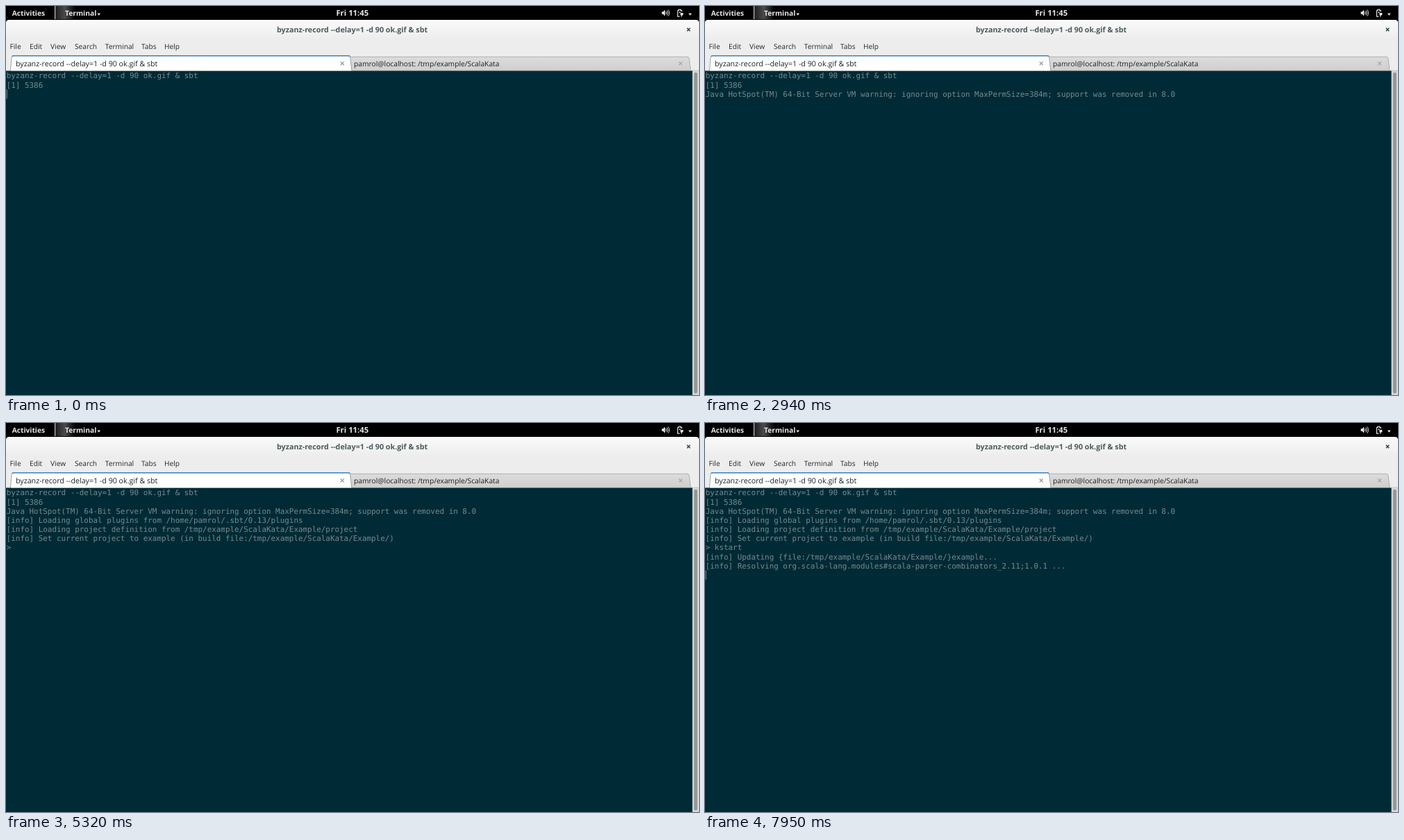
An HTML page for the animation above (8 s loop, 998 by 561 pixels).

```html
<!DOCTYPE html>
<html lang="en">
<head>
<meta charset="utf-8">
<title>Terminal session</title>
<style>
  html, body { margin: 0; width: 100%; height: 100%; overflow: hidden; background: #000; }
  svg { display: block; width: 100vw; height: 100vh; }
  text { font-family: "Open Sans", "Noto Sans", sans-serif; text-rendering: geometricPrecision; white-space: pre; }
  .panel { font-weight: 700; fill: #e6e6e6; }
  .title { font-weight: 700; font-size: 10.75px; fill: #4c5b5e; }
  .menu { font-size: 10.2px; fill: #22282a; }
  .tab { font-size: 10.66px; fill: #1c2123; }
  #screen text { font: 10.92px "DejaVu Sans Mono", monospace; fill: #839496; fill-opacity: .9; }
</style>
</head>
<body>
<svg viewBox="0 0 998 561" preserveAspectRatio="none">
  <defs>
    <linearGradient id="bar" x2="0" y2="1">
      <stop stop-color="#fafafa"/><stop offset="1" stop-color="#ededed"/>
    </linearGradient>
    <linearGradient id="idleTab" x2="0" y2="1">
      <stop stop-color="#dcdcdc"/><stop offset="1" stop-color="#cecece"/>
    </linearGradient>
    <linearGradient id="icon">
      <stop stop-color="#222"/><stop offset=".45" stop-color="#4a4c4a"/><stop offset="1" stop-color="#000"/>
    </linearGradient>
  </defs>

  <!-- Top panel -->
  <rect width="998" height="21"/>
  <rect x="72" width="28" height="19" fill="url(#icon)"/>
  <rect x="70" width="1.3" height="19" fill="#c8c8c8"/>
  <g class="panel">
    <text x="8.7" y="14" font-size="10.2">Activities</text>
    <text x="85" y="14" font-size="10.3">Terminal</text>
    <text x="498.8" y="14" font-size="11.3" text-anchor="middle">Fri 11:45</text>
    <path d="M131.3 10.5h4.8l-2.4 3.2zM982.8 10.5h4.8l-2.4 3.2z"/>
    <path d="M944.5 8.2h2l2.6-2.6v8.8l-2.6-2.6h-2z"/>
    <path d="M950.4 8q1.5 2 0 4M952 6.6q2.6 3.4 0 6.8M953.6 5.4q3.6 4.6 0 9.2" fill="none" stroke="#e6e6e6"/>
    <path d="M967.3 6.3h1.6v-1.3h2.6v1.3h1.6v2M967.3 6.3v8.8h3" fill="none" stroke="#e6e6e6" stroke-width="1.2"/>
    <path d="M969 8.5h2.6v1.2h-2.6zM971.3 10h4v2.2q-.4 1.4-2 1.6v1.9h-1v-1.9q-1-.4-1-1.6z"/>
  </g>

  <!-- Window frame -->
  <path d="M0 94V25Q0 20 5 20H993Q998 20 998 25V94Z" fill="#ededed"/>
  <path d="M0 48V25Q0 20 5 20H993Q998 20 998 25V48Z" fill="url(#bar)"/>
  <text class="title" x="390" y="38">byzanz-record --delay=1 -d 90 ok.gif &amp; sbt</text>
  <path d="M980.8 31.8l4.4 4.4m0-4.4l-4.4 4.4" stroke="#2f464b" stroke-width="1.6"/>
  <g class="menu">
    <text x="5.5" y="62">File</text>
    <text x="34" y="62">Edit</text>
    <text x="64" y="62">View</text>
    <text x="99" y="62">Search</text>
    <text x="142.8" y="62">Terminal</text>
    <text x="195" y="62">Tabs</text>
    <text x="228" y="62">Help</text>
  </g>

  <!-- Tabs -->
  <path d="M494 94V73.3H981Q983.5 73.3 983.8 75.5L986.2 94" fill="url(#idleTab)" stroke="#a3a3a3" stroke-width=".8"/>
  <path d="M0 93.3H998" stroke="#a3a3a3" stroke-width=".8"/>
  <path d="M6.3 94L8.2 74Q8.5 71.8 11 71.8H493Q495.3 71.8 495.6 74L498 94" fill="#fff" stroke="#8d9192" stroke-width=".8"/>
  <path d="M8.6 72.8Q9 71.7 11 71.7H493Q495 71.7 495.4 72.8" fill="none" stroke="#3d87c6" stroke-width="1.5"/>
  <text class="tab" x="14" y="87">byzanz-record --delay=1 -d 90 ok.gif &amp; sbt</text>
  <text class="tab" x="501" y="87" style="font-size:10.27px">pamrol@localhost: /tmp/example/ScalaKata</text>
  <path d="M481.8 80.3l5 5m0-5l-5 5" stroke="#8c8f90" stroke-width="1.2"/>
  <path d="M969 80.3l5 5m0-5l-5 5" stroke="#a2a4a5" stroke-width="1.2"/>

  <!-- Terminal -->
  <rect y="93.6" width="989" height="468" fill="#002b36"/>
  <rect x="988.5" y="93.6" width="9.5" height="468" fill="#dadada"/>
  <rect x="990.8" y="95.8" width="5" height="463" rx="2.3" fill="#949798"/>
  <g id="screen"><rect id="cursor" width="1" height="13.15" fill="#839496"/></g>
</svg>

<script>
  const DURATION = 8000, CELL = 6.575, LEADING = 13.15, LEFT = 0.73, TOP = 94.25, ROWS = 9;

  // Printed lines: [time, row, text]
  const prints = [
    [0, 0, 'byzanz-record --delay=1 -d 90 ok.gif & sbt'],
    [0, 1, '[1] 5386'],
    [80, 2, 'Java HotSpot(TM) 64-Bit Server VM warning: ignoring option MaxPermSize=384m; support was removed in 8.0'],
    [3090, 3, '[info] Loading global plugins from /home/pamrol/.sbt/0.13/plugins'],
    [4170, 4, '[info] Loading project definition from /tmp/example/ScalaKata/Example/project'],
    [4770, 5, '[info] Set current project to example (in build file:/tmp/example/ScalaKata/Example/)'],
    [4900, 6, '> '],
    [7680, 7, '[info] Updating {file:/tmp/example/ScalaKata/Example/}example...'],
    [7720, 8, '[info] Resolving org.scalatest#scalatest_2.11;2.2.1 ...'],
    [7870, 8, '[info] Resolving org.scala-lang#scala-compiler;2.11.4 ...'],
    [7950, 8, '[info] Resolving org.scala-lang.modules#scala-parser-combinators_2.11;1.0.1 ...'],
  ];

  // Cursor states: [time, row, column]; no row means hidden
  const cursors = [
    [0, 2, 0], [80, 3, 0], [570], [1140, 3, 0], [1740], [2350, 3, 0], [2940],
    [3510, 4, 0], [4130], [4700, 5, 0], [4770, 6, 0], [4900, 6, 2],
    [5320], [5910, 6, 2], [6520],
    [7410, 7, 0], [7680, 8, 0], [7720, 9, 0],
  ];

  const command = 'kstart';
  [6650, 6690, 6840, 6990, 7060, 7260].forEach((time, i) => {
    prints.push([time, 6, '> ' + command.slice(0, i + 1)]);
    cursors.push([time, 6, i + 3]);
  });
  const byTime = (a, b) => a[0] - b[0];
  prints.sort(byTime);
  cursors.sort(byTime);

  const screen = document.getElementById('screen');
  const cursor = document.getElementById('cursor');
  const lines = Array.from({ length: ROWS }, (_, row) => {
    const line = document.createElementNS(screen.namespaceURI, 'text');
    line.setAttribute('x', LEFT);
    line.setAttribute('y', TOP + row * LEADING + 10.2);
    return screen.appendChild(line);
  });

  function render(now) {
    const time = now % DURATION;
    const content = Array(ROWS).fill('');
    for (const [at, row, text] of prints) if (at <= time) content[row] = text;
    lines.forEach((line, row) => {
      if (line.textContent !== content[row]) line.textContent = content[row];
    });

    const [, row, column] = cursors.filter(([at]) => at <= time).pop();
    cursor.style.visibility = row === undefined ? 'hidden' : 'visible';
    if (row !== undefined) {
      cursor.setAttribute('x', LEFT + column * CELL);
      cursor.setAttribute('y', TOP + row * LEADING);
    }
  }

  function tick(now) {
    render(now);
    requestAnimationFrame(tick);
  }
  render(0);
  requestAnimationFrame(tick);
</script>
</body>
</html>
```
